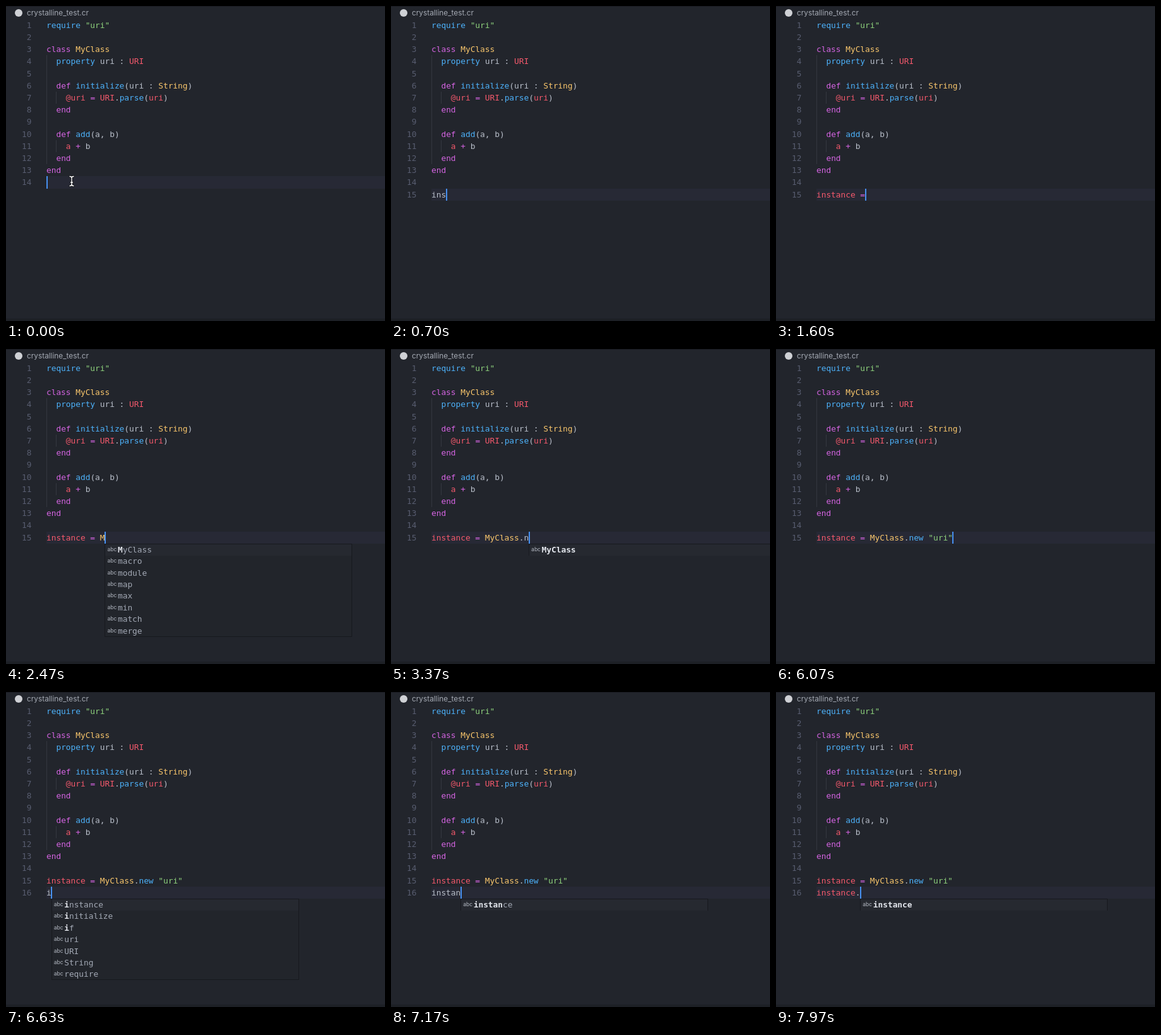
These frames come from a looping animation (600 by 500 pixels, 8000 ms). An HTML page:

```html
<!DOCTYPE html>
<html lang="en">
<head>
<meta charset="utf-8">
<title>Editor typing</title>
<style>
  html, body { margin: 0; width: 100%; height: 100%; overflow: hidden; background: #22252c; }
  #stage { position: relative; width: 600px; height: 500px; overflow: hidden; background: #22252c;
    font: 12.8px/19.2px "DejaVu Sans Mono", monospace; color: #b9bfca; }
  #stage > * { position: absolute; margin: 0; white-space: pre; }
  pre { font: inherit; }
  #top { left: 0; top: 0; width: 600px; height: 1px; background: #1a1c22; }
  #bottom { left: 0; top: 496px; width: 600px; height: 4px; background: #1d2026; }
  #badge { left: 14px; top: 5px; width: 12px; height: 12px; border-radius: 50%; background: #cfd1d5; }
  #title { left: 33px; top: 2px; font: 11.8px/18px Inter, sans-serif; color: #a5aab4; }
  #numbers { left: 0; top: 20.8px; width: 40.5px; text-align: right; color: #585d70; }
  #code { left: 64px; top: 20.8px; }
  #active { left: 64px; width: 536px; height: 19.2px; background: #272935; }
  #caret { width: 2px; height: 19.2px; background: #4690f0; }
  .guide { width: 1px; background: #343740; }
  #popup { width: 392px; box-sizing: border-box; border: 1px solid #17191e; background: #22252b; }
  #popup div { position: relative; height: 18.4px; line-height: 18.4px; padding-left: 19.5px; color: #a3a9b5; }
  #popup div:first-child { background: #262930; }
  #popup i { position: absolute; left: 3px; top: -1px; font: 8.5px/18.4px Inter, sans-serif; color: #b4b9c3; }
  #popup b { color: #e3e6ed; }
  .p { color: #d564e2 } .b { color: #4db2fb } .r { color: #f5596c }
  .y { color: #fac76c } .g { color: #8fd37d }
</style>
</head>
<body>
<div id="stage">
  <div id="active"></div>
  <div id="top"></div><div id="bottom"></div>
  <div id="badge"></div><div id="title">crystalline_test.cr</div>
  <div class="guide" style="left:64px;top:78px;height:173px"></div>
  <div class="guide" style="left:79px;top:136px;height:19px"></div>
  <div class="guide" style="left:79px;top:213px;height:19px"></div>
  <pre id="numbers"></pre>
  <pre id="code"></pre>
  <div id="caret"></div>
  <div id="popup"></div>
  <svg id="pointer" style="left:97px;top:268px" width="14" height="20" fill="none" stroke-linecap="round">
    <path id="beam" d="M4 2.5Q7 2.5 7 5Q7 2.5 10 2.5M7 5V15M4 17.5Q7 17.5 7 15Q7 17.5 10 17.5M5.5 12H8.5" stroke="#15171b" stroke-width="3"/>
    <use href="#beam"/>
    <path d="M4 2.5Q7 2.5 7 5Q7 2.5 10 2.5M7 5V15M4 17.5Q7 17.5 7 15Q7 17.5 10 17.5M5.5 12H8.5" stroke="#fff" stroke-width="1.4"/>
  </svg>
</div>
<script>
const LOOP = 8000, CHAR = 7.706, ROW = 19.2, LEFT = 64, TOP = 20.8, ITEM = 18.4;
const el = id => document.getElementById(id);

// c[text] colours text with class c
const paint = s => s.replace(/([a-z])\[(.*?)\]/g, '<span class="$1">$2</span>');

const program = paint(`b[require] g["uri"]

p[class] y[MyClass]
  b[property] uri : r[URI]

  p[def] b[initialize](uri : y[String])
    r[@uri] p[=] r[URI].b[parse](r[uri])
  p[end]

  p[def] b[add](a, b)
    r[a] p[+] b
  p[end]
p[end]
`);

// Start time of each burst of typing, then the pause before each further key
const bursts = [
  [150, "\n"],
  [400, "instance", 125],
  [1370, " =", 160],
  [1750, " "],
  [2300, "M"],
  [2560, "yClass.", 115],
  [3370, "new", 190],
  [4300, " "],
  [4600, '"'],
  [5080, "uri", 130],
  [5750, '"'],
  [6300, "\n"],
  [6520, "instance", 124],
  [7750, "."]
];
const keys = bursts.flatMap(([start, text, gap]) =>
  [...text].map((char, i) => ({ time: start + i * (gap || 0), char })));

function colour(line) {
  return paint(line
    .replace(/"[^"]*"?/, "g[$&]")
    .replace(/^instance(?= =|\.)/, "r[$&]")
    .replace(" =", " p[=]")
    .replace(/\bM\w*/, "y[$&]")
    .replace(/\.new\b/, ".b[new]"));
}

function suggestions(row, before) {
  const word = before.split(" ").pop();
  if (word === "i")
    return [row === 16 ? "instance" : "include", "initialize", "if", "uri", "URI", "String", "require"];
  if (word === "in")
    return row === 16 ? ["instance", "initialize", "include", "inline", "inspect", "String"]
                      : ["include", "initialize", "inspect", "String"];
  if (word === "M") return ["MyClass", "macro", "module", "map", "max", "min", "match", "merge"];
  if (/^MyClass\.new?$/.test(word)) return ["new", "new(uri : String)"];
  if (word.startsWith("My")) return ["MyClass"];
  return row === 16 && word.startsWith("ins") ? ["instance"] : [];
}

function stateAfter(count) {
  const lines = [""];
  let after = "";
  for (const { char } of keys.slice(0, count)) {
    if (char === "\n") { lines.push(""); continue; }
    if (char === '"') after = after ? "" : '"';
    lines[lines.length - 1] += char;
  }
  return { lines, after, before: lines[lines.length - 1], row: 13 + lines.length };
}

function show(count) {
  const { lines, after, before, row } = stateAfter(count);
  const y = TOP + (row - 1) * ROW, x = LEFT + before.length * CHAR;
  const shown = [...lines.slice(0, -1), before + after];
  el("code").innerHTML = program + shown.map(colour).join("\n");
  el("numbers").textContent = Array.from({ length: row }, (_, i) => i + 1).join("\n");
  el("active").style.top = el("caret").style.top = y + "px";
  el("caret").style.left = x - 0.4 + "px";
  el("pointer").style.display = count ? "none" : "";

  const items = suggestions(row, before), words = before.split(/\W+/).filter(Boolean);
  const popup = el("popup");
  popup.style.display = items.length ? "" : "none";
  popup.style.left = x + "px";
  popup.style.top = y + ROW + "px";
  popup.style.height = items.length * ITEM + 0.6 + "px";
  popup.innerHTML = items.map(item => {
    const hit = (words.find(w => item.startsWith(w)) || "").length;
    return `<div><i>abc</i><b>${item.slice(0, hit)}</b>${item.slice(hit)}</div>`;
  }).join("");
}

let current = -1;
const origin = performance.now();
function tick() {
  const t = (performance.now() - origin) % LOOP;
  const count = keys.filter(k => k.time <= t).length;
  if (count !== current) show(current = count);
  const idle = t - (count ? keys[count - 1].time : 0);
  el("caret").style.opacity = idle % 800 < 400 ? 1 : 0;
  requestAnimationFrame(tick);
}
tick();
</script>
</body>
</html>
```
